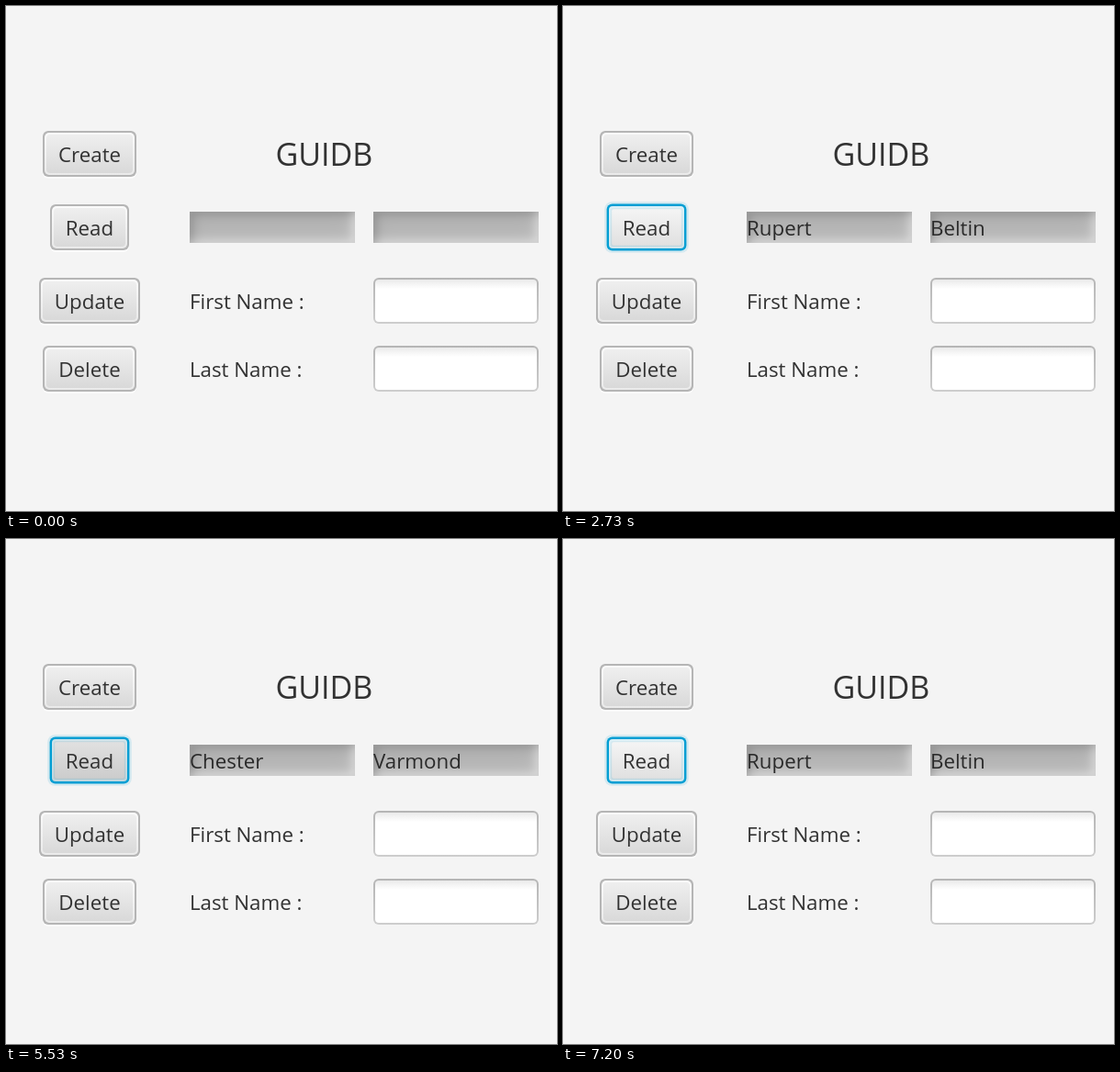
An HTML page with a canvas for the animation above (8 s loop, 600 by 550 pixels).

```html
<!DOCTYPE html>
<html lang="en">
<head>
<meta charset="utf-8">
<title>GUIDB</title>
<style>
  html, body { margin: 0; width: 100%; height: 100%; overflow: hidden; background: #f4f4f4; }
  canvas { display: block; }
</style>
</head>
<body>
<canvas id="stage" width="600" height="550"></canvas>
<script>
const ctx = document.getElementById('stage').getContext('2d');
const LOOP = 8000;
const FONT = '"Open Sans", "Noto Sans", sans-serif';
const INK = '#323232';

const PEOPLE = {
  rupert: ['Rupert', 'Beltin'],
  chester: ['Chester', 'Varmond'],
  ned: ['Ned', 'Brask'],
};

// Start time, state of the Read button, focus ring, record on show.
const TIMELINE = [
  [0, 'normal', false, null],
  [330, 'hover', false, null],
  [1070, 'pressed', true, null],
  [2270, 'hover', true, 'ned'],
  [2670, 'pressed', true, 'ned'],
  [2730, 'hover', true, 'rupert'],
  [4130, 'pressed', true, 'rupert'],
  [4200, 'hover', true, 'chester'],
  [5530, 'pressed', true, 'chester'],
  [5600, 'hover', true, 'ned'],
  [7070, 'pressed', true, 'ned'],
  [7200, 'hover', true, 'rupert'],
];

const SKINS = {
  normal: { border: '#b5b5b5', inner: ['#fafafa', '#eaeaea'], body: ['#efefef', '#d9d9d9'] },
  hover: { border: '#bababa', inner: ['#fcfcfc', '#f0f0f0'], body: ['#f5f5f5', '#e0e0e0'] },
  pressed: { border: '#ababab', inner: ['#efefef', '#dedede'], body: ['#e1e1e1', '#cccccc'] },
};

function vertical(y0, y1, [from, to]) {
  const gradient = ctx.createLinearGradient(0, y0, 0, y1);
  gradient.addColorStop(0, from);
  gradient.addColorStop(1, to);
  return gradient;
}

function box({ x, y, w, h }, inset, radius, fill) {
  ctx.fillStyle = fill;
  ctx.beginPath();
  ctx.roundRect(x + inset, y + inset, w - 2 * inset, h - 2 * inset, radius);
  ctx.fill();
}

function text(string, x, y, size = 22.3, align = 'left', color = INK) {
  ctx.font = `${size}px ${FONT}`;
  ctx.textAlign = align;
  ctx.fillStyle = color;
  ctx.fillText(string, x, y);
}

function button(label, x, y, w, state = 'normal', focused = false) {
  const area = { x, y, w, h: 50 };
  const skin = SKINS[state];
  const inner = vertical(y + 2, y + 48, skin.inner);
  const body = vertical(y + 4, y + 46, skin.body);
  if (focused) {
    box(area, -0.4, 6, '#039ed3');
    box(area, 2, 4, inner);
    box(area, 4, 2, body);
    box(area, -2.8, 8, 'rgba(3, 158, 211, 0.133)');
    box(area, 5.2, 2, body);
  } else {
    box({ ...area, h: 52 }, 0, 6, '#fcfcfc');
    box(area, 0, 6, skin.border);
    box(area, 2, 5, inner);
    box(area, 4, 4, body);
  }
  text(label, x + w / 2, y + 34, 22.3, 'center');
}

function field(x, y) {
  const area = { x, y, w: 180, h: 50 };
  box(area, 0, 6, vertical(y, y + 50, ['#b5b5b5', '#cdcdcd']));
  box(area, 2, 4, vertical(y + 2, y + 12, ['#eaeaea', '#ffffff']));
}

// A flat plate with soft edges, lit from the lower right.
function makePlate(w, h) {
  const plate = document.createElement('canvas');
  plate.width = w;
  plate.height = h;
  const plateCtx = plate.getContext('2d');
  const image = plateCtx.createImageData(w, h);
  const edge = d => 1 / (1 + Math.exp(-d / 3.6));
  const slope = d => 4 * edge(d) * (1 - edge(d));
  const profile = (d, size) => ({
    height: edge(d) + edge(size - d) - 1,
    tilt: slope(d) - slope(size - d),
  });
  for (let y = 0; y < h; y++) {
    const v = profile(y + 0.5, h);
    for (let x = 0; x < w; x++) {
      const u = profile(x + 0.5, w);
      const shade = 181 - 24 * (u.tilt * v.height + v.tilt * u.height);
      const i = 4 * (y * w + x);
      image.data.fill(shade, i, i + 3);
      image.data[i + 3] = 255;
    }
  }
  plateCtx.putImageData(image, 0, 0);
  return plate;
}

const plate = makePlate(180, 34);

function draw(time) {
  const [, state, focused, person] = TIMELINE.findLast(step => step[0] <= time);

  ctx.fillStyle = '#f4f4f4';
  ctx.fillRect(0, 0, 600, 550);

  button('Create', 40, 136, 102);
  button('Read', 48, 216, 86, state, focused);
  button('Update', 36, 296, 110);
  button('Delete', 40, 370, 102);

  text('GUIDB', 346.5, 174, 34, 'center');
  text('First Name :', 200, 330);
  text('Last Name :', 200, 404);
  field(400, 296);
  field(400, 370);

  [200, 400].forEach((x, i) => {
    ctx.drawImage(plate, x, 224);
    if (person) text(PEOPLE[person][i], x, 250, 22.3, 'left', '#2a2a2a');
  });
}

function tick() {
  draw(performance.now() % LOOP);
  requestAnimationFrame(tick);
}
tick();
</script>
</body>
</html>
```
